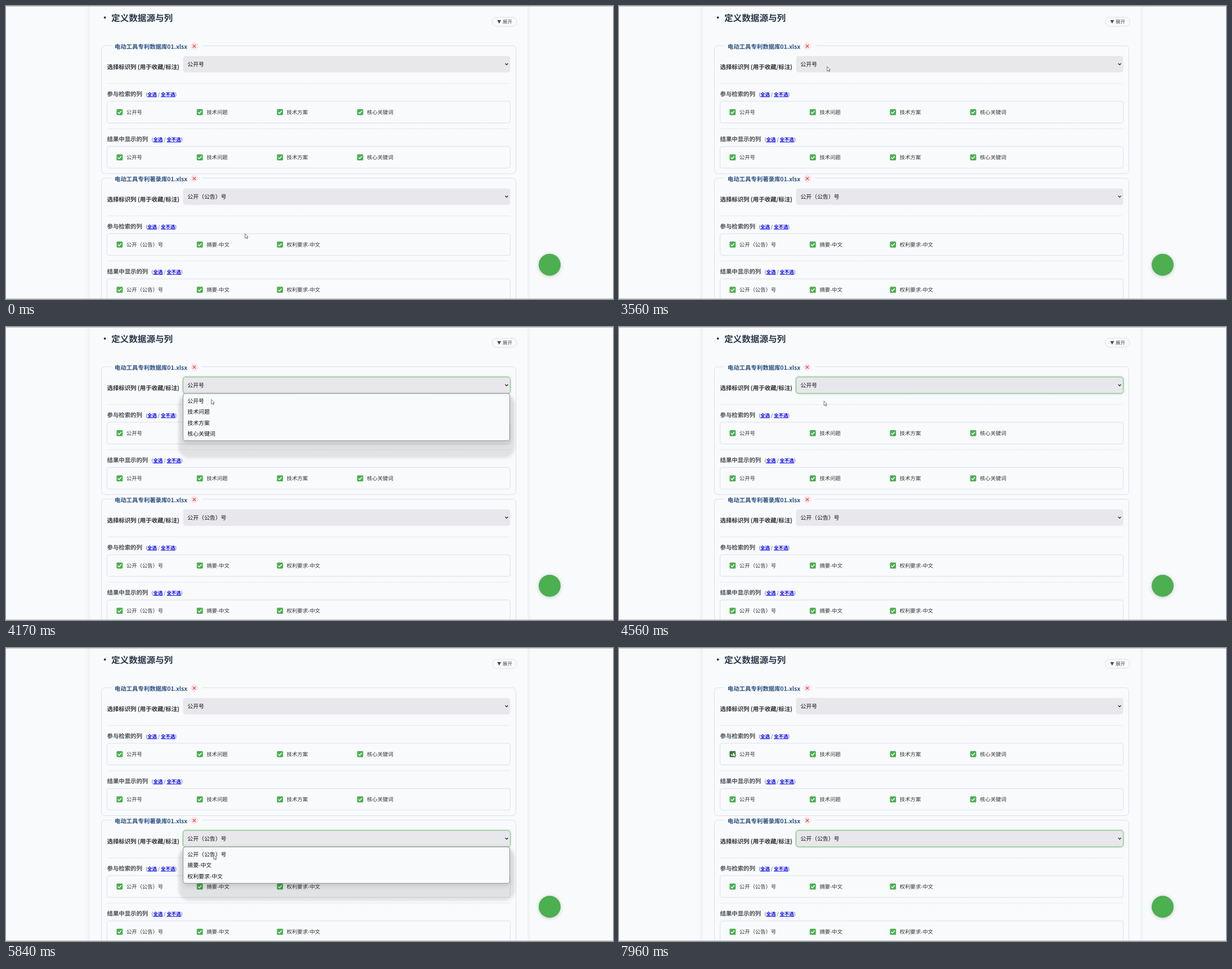
These frames come from a looping animation (1078 px wide and 520 px high, 8000 ms). An HTML page:

```html
<!DOCTYPE html>
<html lang="zh-CN">
<head>
<meta charset="utf-8">
<style>
  html, body { margin: 0; width: 100%; height: 100%; overflow: hidden; background: #f8fafc; }
  svg { display: block; width: 1078px; height: 520px; font-family: "Noto Sans CJK SC", "Noto Sans CJK", sans-serif; white-space: pre; text-rendering: geometricPrecision; }
  .bold { font-weight: 700; }
  .link { font-weight: 700; fill: #0000ee; text-decoration: underline; }
  .card { fill: #f8fafc; stroke: #edf0f4; filter: drop-shadow(0 2px 3px rgba(40, 60, 90, .09)); }
  .outline { fill: none; stroke: #dde2e8; }
  .dash { stroke: #d6dae0; stroke-dasharray: 2 1.4; stroke-width: .8; }
  .popup-box { stroke: #8b8d8f; stroke-width: .9; filter: drop-shadow(0 4px 4px rgba(0, 0, 0, .13)); }
  .popup-shade { fill: rgba(0, 0, 0, .095); filter: blur(2px); }
  .fab { fill: #4caf50; filter: drop-shadow(0 1.5px 3px rgba(0, 0, 0, .2)); }
</style>
</head>
<body>
<svg id="stage" viewBox="0 0 1078 520"></svg>
<script>
const LOOP = 8000;
const TICK = 120;
const GROUP_STEP = 235;
const ROW = 19.2;

const groups = [
  { file: '电动工具专利数据库01.xlsx', columns: ['公开号', '技术问题', '技术方案', '核心关键词'], open: 3690, close: 4560, blur: 5460 },
  { file: '电动工具专利著录库01.xlsx', columns: ['公开（公告）号', '摘要-中文', '权利要求-中文'], open: 5460, close: 6210, blur: LOOP },
];

// Places text by the vertical middle of its ideographs.
const text = (x, middle, size, fill, content, cls = '') =>
  `<text x="${x}" y="${middle + size * .38}" font-size="${size}" fill="${fill}" class="${cls}">${content}</text>`;

const rect = (x, y, w, h, r, attrs) =>
  `<rect x="${x}" y="${y}" width="${w}" height="${h}" rx="${r}" ${attrs}/>`;

const dash = y => `<path class="dash" d="M180 ${y}H895"/>`;

const checkbox = (x, y, id) =>
  rect(x - 5.4, y - 5.4, 10.8, 10.8, 1.6, `fill="#4caf50" ${id ? `id="${id}"` : ''}`) +
  `<path d="M${x - 3} ${y + .2}l2.1 2.2 4-4.5" fill="none" stroke="#fff" stroke-width="1.5"/>`;

function columnSection(title, top, columns, id) {
  const linkX = 179.5 + title.length * 10.4 + 6.3;
  const links = '(<tspan class="link">全选</tspan> / <tspan class="link">全不选</tspan>)';
  return dash(top) +
    text(179.5, top + 18.5, 10.4, '#4a4f55', title, 'bold') +
    text(linkX, top + 19, 8.45, '#444', links) +
    rect(179.5, top + 31.5, 716, 38.5, 4, 'class="outline"') +
    columns.map((name, i) => {
      const x = 201.8 + i * 142.4, y = top + 50.8;
      return checkbox(x, y, i ? '' : id) + text(x + 12, y + .3, 9.36, '#333', name);
    }).join('');
}

function group({ file, columns }, i) {
  return `<g transform="translate(0 ${i * GROUP_STEP})">` +
    rect(169.5, 70.5, 736, 227, 6, 'class="outline"') +
    rect(187, 66, 162, 10, 0, 'fill="#f8fafc"') +
    text(192.8, 71.7, 10.4, '#2c5282', file, 'bold') +
    '<circle cx="334.3" cy="71.2" r="6.7" fill="#fde6e8"/>' +
    '<path d="M331.7 68.6l5.2 5.2m0-5.2l-5.2 5.2" stroke="#d9363e" stroke-width="1.1"/>' +
    text(179.5, 108.3, 10.4, '#2b2f33', '选择标识列 (用于收藏/标注)', 'bold') +
    rect(314.5, 88.8, 581, 29, 4.5, `id="select${i}"`) +
    text(322.3, 103.6, 9.9, '#111', columns[0]) +
    '<path d="M886.6 101.9l2.5 2.5 2.5-2.5" fill="none" stroke="#111" stroke-width="1.2"/>' +
    columnSection('参与检索的列', 137.5, columns, `search${i}`) +
    columnSection('结果中显示的列', 217.8, columns, `result${i}`) +
    '</g>';
}

function popup({ columns }, i) {
  const height = columns.length * ROW + 7;
  return `<g id="popup${i}" transform="translate(0 ${i * GROUP_STEP})">` +
    rect(306, 119, 598, height + 30, 20, 'class="popup-shade"') +
    rect(314.5, 118, 580, height, 4, `class="popup-box" id="popupBox${i}"`) +
    `<g id="options${i}">` +
    columns.map((name, k) => text(322.3, 131.4 + k * ROW, 9.9, '#111', name)).join('') +
    '</g></g>';
}

const $ = id => document.getElementById(id);

$('stage').innerHTML =
  rect(0, 0, 1078, 520, 0, 'fill="#f8fafc"') +
  rect(148, -20, 779, 570, 6, 'class="card"') +
  '<circle cx="175.6" cy="20.5" r="1.9" fill="#2d3748"/>' +
  text(187, 20.8, 15.6, '#2d3748', '定义数据源与列', 'bold') +
  rect(863.5, 20, 43.5, 16, 8, 'fill="#f9fafb" stroke="#dde1e6"') +
  '<path d="M872.4 25h6.8l-3.4 6.2z" fill="#444b55"/>' +
  text(882, 28.2, 8.45, '#444b55', '展开') +
  groups.map(group).join('') +
  '<circle class="fab" cx="965.5" cy="459.2" r="19.5"/>' +
  groups.map(popup).join('') +
  '<path id="cursor" d="M0 0V8.2L2 6.5L3.3 9.2L4.5 8.6L3.3 6H5.6Z" fill="#fff" stroke="#555" stroke-width=".8"/>' +
  '<path d="M0 .5H1078M0 519.5H1078" stroke="#bcbec0"/>';

// Each move eases the pointer to a place in a number of ticks, optionally bent toward a point.
const home = [424.5, 404];
const moves = [
  { at: 1400, ticks: 2, to: [411, 357] },
  { at: 1670, ticks: 7, to: [194.3, 176], via: [215, 40] },
  { at: 2530, ticks: 2, to: [197, 183] },
  { at: 3150, ticks: 4, to: [369.7, 107.5] },
  { at: 4050, ticks: 3, to: [364, 131.3] },
  { at: 4840, ticks: 2, to: [363.5, 331] },
  { at: 5210, ticks: 1, to: [363.5, 338] },
  { at: 5600, ticks: 3, to: [368.8, 367] },
  { at: 6830, ticks: 5, to: [202, 185] },
];

const easeOut = p => 1 - (1 - p) ** 2;

function pointerAt(t) {
  let place = home;
  for (const { at, ticks, to, via } of moves) {
    if (t < at) break;
    const p = easeOut(Math.min(1, (Math.floor((t - at) / TICK) + 1) / ticks));
    place = place.map((from, i) => {
      const bend = via ? via[i] : (from + to[i]) / 2;
      return (1 - p) ** 2 * from + 2 * p * (1 - p) * bend + p * p * to[i];
    });
  }
  return place;
}

const selectLooks = {
  idle: ['#e8e7eb', 'none', 'none'],
  leaving: ['#e6e7e8', '#c6d3cb', 'none'],
  entering: ['#e4e5e6', '#9bcd9e', 'drop-shadow(0 0 1px rgba(76,175,80,.3))'],
  focused: ['#e8e7eb', '#7fc183', 'drop-shadow(0 0 1.5px rgba(76,175,80,.6))'],
};

function lookAt(t, { open, blur }) {
  if (t < open || t >= blur + TICK) return 'idle';
  if (t >= blur) return 'leaving';
  return t < open + TICK ? 'entering' : 'focused';
}

function drawGroup(t, g, i) {
  const [fill, stroke, filter] = selectLooks[lookAt(t, g)];
  Object.assign($('select' + i).style, { fill, stroke, filter });

  const ready = i === 1 || t >= g.open + TICK;
  $('popup' + i).style.display = t >= g.open && t < g.close ? '' : 'none';
  $('options' + i).style.display = ready ? '' : 'none';
  $('popupBox' + i).style.fill = ready ? '#f8fafc' : '#e3e4e5';
}

function draw(t) {
  $('cursor').setAttribute('transform', `translate(${pointerAt(t)})`);
  groups.forEach((g, i) => drawGroup(t, g, i));
  $('search0').style.fill = t >= 7310 ? '#2e7d32' : '#4caf50';
}

function frame(now) {
  draw(now % LOOP);
  requestAnimationFrame(frame);
}
draw(0);
requestAnimationFrame(frame);
</script>
</body>
</html>
```
